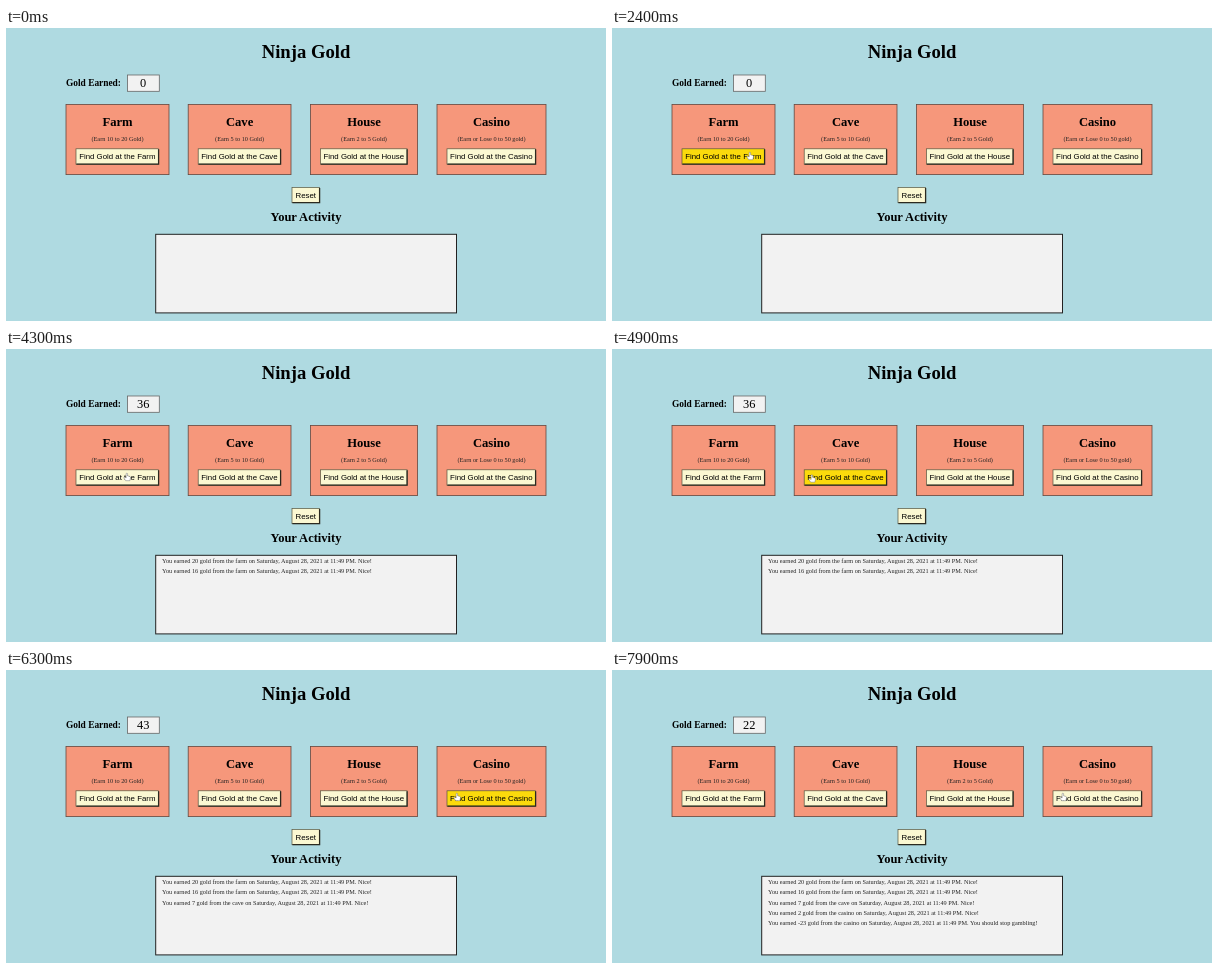
An HTML page that plays this animation: 600 by 293 pixels, repeating every 8000 ms.

```html
<!DOCTYPE html>
<html lang="en">
<head>
<meta charset="utf-8">
<title>Ninja Gold</title>
<style>
html, body { margin: 0; width: 100%; height: 100%; overflow: hidden; background: #afdae1; }
svg { display: block; width: 600px; height: 293px; font-family: "Liberation Serif", "Times New Roman", serif; fill: #000; }
.b { font-weight: bold; }
.m { text-anchor: middle; }
.note { font-size: 6.25px; fill: #222; }
.btn text { font: 7.85px "Liberation Sans", Arial, sans-serif; }
.btn rect { fill: #fbf8d2; stroke: #55543f; stroke-width: .7; }
.btn path { fill: none; stroke: #2b2a20; stroke-width: 1.3; }
.btn.hot rect { fill: #fbda0c; }
.card { fill: #f6977b; stroke: #65483f; stroke-width: .8; }
</style>
</head>
<body>
<svg id="stage" viewBox="0 0 600 293">
  <text class="b m" x="300" y="29.7" font-size="18.65">Ninja Gold</text>
  <text class="b" x="60" y="58.4" font-size="9.4">Gold Earned:</text>
  <rect x="121.5" y="47" width="31.8" height="16.3" fill="#f2f2f2" stroke="#666" stroke-width=".8"/>
  <text id="gold" class="m" x="137.2" y="59.3" font-size="12.4">0</text>
  <text class="b m" x="300" y="193.3" font-size="12.5">Your Activity</text>
  <rect x="149.7" y="206.3" width="300.8" height="78.6" fill="#f2f2f2" stroke="#222" stroke-width="1"/>
  <g id="log"></g>
  <g id="cards"></g>
  <g id="cursor" fill="#fff" stroke="#666" stroke-width=".45" stroke-linejoin="round">
    <path id="hand" d="M-.9-3.4q.8-.8 1.5 0v2.2l2.4.7q.7.3.5 1.2l-.6 3H-1.3L-3.2.9q0-1 1-.7l1.3.8z"/>
    <path id="arrow" d="M-1.5-3v6l1.4-1.2 1 2 1-.5-.9-1.9 1.8-.2z"/>
  </g>
</svg>
<script>
const LOOP = 8000, STEP = 100;
const $ = id => document.getElementById(id);

function add(parent, tag, attrs, text = '') {
  const el = document.createElementNS('http://www.w3.org/2000/svg', tag);
  for (const k in attrs) el.setAttribute(k, attrs[k]);
  el.textContent = text;
  return parent.appendChild(el);
}

function button(x, y, w, h, label) {
  const g = add($('cards'), 'g', { class: 'btn' });
  add(g, 'rect', { x, y, width: w, height: h });
  add(g, 'path', { d: `M${x + .4} ${y + h}H${x + w}V${y + .4}` });
  add(g, 'text', { x: x + w / 2, y: y + 10.4, class: 'm' }, label);
  return g;
}

// name, left edge, width, hint
const buttons = [
  ['Farm', 60, 103, '(Earn 10 to 20 Gold)'],
  ['Cave', 182.2, 102.8, '(Earn 5 to 10 Gold)'],
  ['House', 304.5, 107, '(Earn 2 to 5 Gold)'],
  ['Casino', 431, 109, '(Earn or Lose 0 to 50 gold)']
].map(([name, x, w, hint]) => {
  const mid = x + w / 2, cards = $('cards');
  add(cards, 'rect', { x, y: 76.4, width: w, height: 70.2, class: 'card' });
  add(cards, 'text', { x: mid, y: 97.6, class: 'b m', 'font-size': 12.6 }, name);
  add(cards, 'text', { x: mid, y: 112.6, class: 'note m' }, hint);
  return button(x + 10, 120.8, w - 20.4, 15.4, `Find Gold at the ${name}`);
});
button(286, 159.5, 27.6, 15.2, 'Reset');

// time, total, amount, place, remark
const visits = [
  [3200, 20, 20, 'farm', 'Nice!'],
  [4200, 36, 16, 'farm', 'Nice!'],
  [5200, 43, 7, 'cave', 'Nice!'],
  [6400, 45, 2, 'casino', 'Nice!'],
  [7200, 22, -23, 'casino', 'You should stop gambling!']
];
const lines = visits.map(([, , n, place, remark], i) =>
  add($('log'), 'text', { x: 156, y: 213.8 + 10.35 * i, class: 'note' },
    `You earned ${n} gold from the ${place} on Saturday, August 28, 2021 at 11:49 PM. ${remark}`));

// button index, start, end
const hovers = [
  [2, 1600, 1800], [1, 2000, 2200], [0, 2400, 3200], [0, 3800, 4200], [0, 4700, 4800],
  [1, 4900, 5200], [2, 5600, 5900], [3, 6100, 6400], [3, 6800, 7200]
];

// time, x, y
const path = [
  [1500, 412, 158], [1700, 378, 137], [1800, 330, 133], [2000, 256, 129], [2200, 180, 128],
  [2400, 138, 128], [2600, 121, 128], [4600, 121, 128], [4800, 168, 130], [5000, 232, 129],
  [5300, 238, 129], [5500, 305, 131], [5700, 360, 130], [5900, 416, 128], [6200, 451, 127],
  [8000, 451, 127]
];

function place(t) {
  const i = path.findIndex(p => p[0] > t);
  const [t0, x0, y0] = path[i - 1], [t1, x1, y1] = path[i];
  const k = (t - t0) / (t1 - t0);
  return [x0 + (x1 - x0) * k, y0 + (y1 - y0) * k];
}

function draw(now) {
  const t = Math.floor(now % LOOP / STEP) * STEP;
  const done = visits.filter(v => t >= v[0]).length;
  $('gold').textContent = done ? visits[done - 1][1] : 0;
  lines.forEach((el, i) => el.style.display = i < done ? '' : 'none');
  buttons.forEach((el, i) =>
    el.classList.toggle('hot', hovers.some(([b, from, to]) => b === i && t >= from && t < to)));

  const shown = t >= path[0][0];
  $('cursor').style.display = shown ? '' : 'none';
  if (shown) {
    const [x, y] = place(t);
    const over = [[70, 153], [192, 275], [314, 402], [441, 530]].some(([a, b]) => x > a && x < b) && y < 138;
    $('cursor').setAttribute('transform', `translate(${x} ${y})`);
    $('hand').style.display = over ? '' : 'none';
    $('arrow').style.display = over ? 'none' : '';
  }
}

const start = performance.now();
function tick() {
  draw(performance.now() - start);
  requestAnimationFrame(tick);
}
tick();
</script>
</body>
</html>
```
